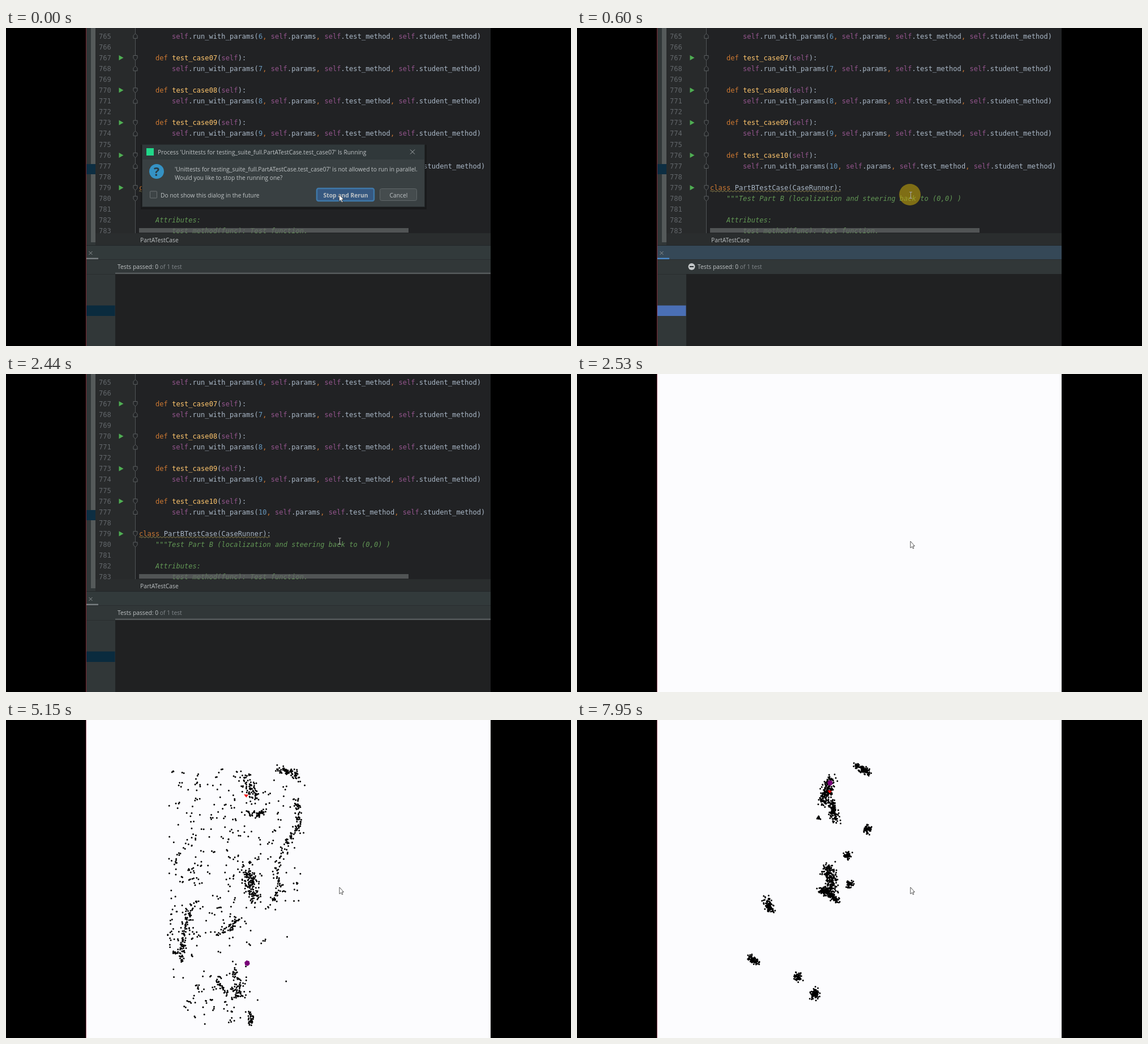
Write an HTML page with a canvas that moves like this. It is 998 by 561 pixels and loops after 8 s.

```html
<!DOCTYPE html>
<html lang="en">
<head>
<meta charset="utf-8">
<title>Particle filter test run</title>
<style>
  html, body { margin: 0; width: 100%; height: 100%; overflow: hidden; background: #000; }
  svg, canvas { position: absolute; left: 0; top: 0; width: 998px; height: 561px; }
  text { white-space: pre; }
  .code { font: 12.1px "DejaVu Sans Mono", monospace; fill: #a9b7c6; }
  .ui { font: 10.3px "Open Sans", sans-serif; fill: #bfc3c5; }
  .num { fill: #62666a; }
  .doc { fill: #629755; font-style: italic; }
  .fold { fill: #222426; stroke: #5c6062; }
</style>
</head>
<body>
<svg viewBox="0 0 998 561">
  <rect x="141" width="715" height="561" fill="#313738"/>
  <rect x="158" width="698" height="362" fill="#212224"/>
  <rect x="158" width="70" height="362" fill="#282a2b"/>
  <rect x="150" width="8" height="378" fill="#555a5a"/>
  <rect x="141" y="240" width="17" height="18" fill="#0d2e42"/>
  <path d="M228.5 0V362" stroke="#505456"/>
  <g id="editor"></g>
  <path id="wave" fill="none" stroke="#96894f"/>
  <rect x="235" y="353" width="476" height="8" fill="#626466" opacity=".75"/>
  <rect x="158" y="362" width="698" height="21" fill="#2a2d2e"/>
  <text class="ui" x="237" y="377.5">PartATestCase</text>
  <rect x="141" y="383" width="715" height="1" fill="#222628"/>

  <rect id="tabs" x="141" y="384" width="715" height="24"/>
  <path d="M146.5 394l6 6m0-6l-6 6" stroke="#8a9092"/>
  <rect id="tabLine" x="142" y="405.5" width="21" height="3"/>
  <path d="M141 408.5H856M141 434.5H193" stroke="#292d2f"/>
  <rect x="193" y="434" width="663" height="127" fill="#202122"/>
  <rect id="bar" x="193" y="431.5" width="663" height="2.5" fill="#565b5c"/>
  <rect id="pick" x="141" width="51.5" height="18.5"/>
  <g id="stopIcon">
    <circle cx="202.5" cy="421" r="6" fill="#c4c8c9"/>
    <path d="M199 421h7" stroke="#2c3234" stroke-width="2"/>
  </g>
  <text id="passed" class="ui" y="425">Tests passed: 0 <tspan fill="#80868a">of 1 test</tspan></text>
  <g id="console" class="code">
    <text x="205" y="448">C:\Users\oak_m\miniconda3\python.exe "C:\Program Files\JetBrains\PyCharm 2020.3.2\plugins\</text>
    <text x="205" y="467">Testing started at 10:17 PM ...</text>
  </g>

  <circle id="halo" cx="588" cy="294" r="19" fill="#c3a50c" opacity=".58"/>
  <path id="beam" d="M587 289.5h5M589.5 290v10M587 300.5h5" stroke="#a5a5a5"/>

  <g id="dialog">
    <rect x="238" y="206" width="505" height="114" opacity=".25"/>
    <rect x="240.5" y="205.5" width="499" height="110" fill="#394042" stroke="#25292b"/>
    <rect x="241" y="206" width="498" height="26" fill="#30383a"/>
    <rect x="248" y="212" width="13" height="13" fill="#21d789"/>
    <text class="ui" x="268" y="223">Process 'Unittests for testing_suite_full.PartATestCase.test_case07' Is Running</text>
    <path d="M714 214.5l8 8m0-8l-8 8" stroke="#a6acae"/>
    <circle cx="266" cy="253" r="13" fill="#3592c4"/>
    <text x="266" y="260.5" text-anchor="middle" fill="#2a3a43" style="font:bold 21px 'Open Sans',sans-serif">?</text>
    <text class="ui" x="298" y="252.5">'Unittests for testing_suite_full.PartATestCase.test_case07' is not allowed to run in parallel.</text>
    <text class="ui" x="298" y="267.5">Would you like to stop the running one?</text>
    <rect x="254.5" y="288" width="12" height="12" rx="1" fill="#3d4446" stroke="#6a7072"/>
    <text class="ui" x="273" y="298.5">Do not show this dialog in the future</text>
    <rect x="549" y="283" width="101" height="22" rx="3" fill="#365880" stroke="#3f78a8" stroke-width="2.5"/>
    <text class="ui" x="600" y="298.5" text-anchor="middle" style="font-weight:bold">Stop and Rerun</text>
    <rect x="660.5" y="283.5" width="65" height="21" rx="3" fill="#454c4e" stroke="#5f6668"/>
    <text class="ui" x="693.5" y="298.5" text-anchor="middle">Cancel</text>
    <path d="M588.5 294v12l2.7-2.5 2 4.3 1.9-.8-2-4.2h3.7z" fill="#fff" stroke="#222" stroke-width=".8"/>
  </g>
  <path d="M141.5 0V561" stroke="#7c2630"/>
  <rect x="856" width="142" height="561"/>
</svg>
<canvas id="field" width="998" height="561"></canvas>

<script>
const LOOP = 8000, WINDOW_OPEN = 2530;
const $ = id => document.getElementById(id);
const show = (id, on) => { $(id).style.display = on ? '' : 'none'; };

// ---- Editor ----
const COLORS = { self: '#94558d', def: '#cc7832', class: '#cc7832', ',': '#cc7832' };
const colorOf = s => COLORS[s] || (/^test_case/.test(s) ? '#ffc66d' : /^\d+$/.test(s) ? '#6897bb' : '#a9b7c6');
const highlight = s => s.split(/(\bself\b|\bdef\b|\bclass\b|test_case\d+|\b\d+\b|,)/)
  .map(part => `<tspan fill="${colorOf(part)}">${part}</tspan>`).join('');
const rowY = row => 14.3 + 19.1 * row;
const line = (row, x, body, cls = '') =>
  `<text class="code ${cls}" x="${x}" y="${rowY(row) + 4.2}">${body}</text>`;
const fold = (row, dir) =>
  `<path class="fold" transform="translate(228.5 ${rowY(row)}) scale(1 ${dir})" d="M-3.5-4h7v5l-3.5 3.5-3.5-3.5z"/>`;
const play = row => `<path d="M199.5 ${rowY(row) - 4.5}l8 4.5-8 4.5z" fill="#4fae53"/>`;

function buildEditor() {
  let out = '';
  for (let row = 0; row < 19; row++) out += line(row, 164, 765 + row, 'num');
  for (let n = 6; n <= 10; n++) {
    const row = (n - 6) * 3;
    if (n > 6) {
      const name = 'test_case' + String(n).padStart(2, '0');
      out += line(row - 1, 264, highlight(`def ${name}(self):`)) + play(row - 1) + fold(row - 1, 1);
    }
    out += line(row, 293, highlight(`self.run_with_params(${n}, self.params, self.test_method, self.student_method)`));
    out += fold(row, -1);
  }
  out += line(14, 235, highlight('class PartBTestCase(CaseRunner):')) + play(14) + fold(14, 1) + fold(15, 1);
  out += line(15, 264, '"""Test Part B (localization and steering back to (0,0) )', 'doc');
  out += line(17, 264, 'Attributes:', 'doc') + line(18, 293, 'test_method(func): Test function.', 'doc');
  $('editor').innerHTML = out;
  $('wave').setAttribute('d', 'M235 288q1.5-2 3 0' + 't3 0'.repeat(76));
}

function drawEditor(t) {
  const active = t >= 550 && t < 870;
  const cleared = t >= 870 && t < 1660;
  show('dialog', t < 500);
  show('beam', t >= 500);
  show('halo', t >= 400 && t < 740);
  show('bar', !active);
  show('stopIcon', active);
  show('passed', !cleared);
  show('console', t >= 1150 && t < 1660);
  $('passed').setAttribute('x', active ? 213 : 197);
  $('pick').setAttribute('y', cleared ? 434.5 : 489.5);
  $('pick').setAttribute('fill', active ? '#4a6fb5' : '#0a2b3e');
  $('tabs').setAttribute('fill', active ? '#354857' : '#323a3b');
  $('tabLine').setAttribute('fill', active ? '#4a88c7' : '#777d80');
}

// ---- Particles ----
const COUNT = 1250, STEP = 136, FIRST = 4140;
const MIDDLE = FIRST + 14 * STEP, LAST = FIRST + 28 * STEP;

let seed = 11;
const rnd = () => {
  seed = (seed * 1664525 + 1013904223) >>> 0;
  return seed / 4294967296;
};
const gauss = () => (rnd() + rnd() + rnd() + rnd() - 2) * 1.73;

// Chance of a particle at a place: full on the left, thinning out to the right.
function density(x, y) {
  if (y > 455 && x < 305) return 0.08;
  const edge = y < 335 ? 500 : 420;
  const thin = y > 395 && y < 450 && x > 330 ? 0.5 : 1;
  return thin * Math.min(1, Math.exp((edge - x) / 30));
}

function scatter() {
  const points = [];
  while (points.length < COUNT) {
    const x = 281 + rnd() * 400, y = 88 + rnd() * 448;
    if (rnd() > density(x, y)) continue;
    for (let k = Math.floor(rnd() * 4); k >= 0; k--)
      points.push([Math.max(281, x + gauss() * 2.5), y + gauss() * 2]);
  }
  return points;
}

// Particles strewn along strokes; each is a spread and the points it runs through.
function strew(strokes) {
  const runs = strokes.map(([spread, ...path]) => {
    const segments = path.slice(1).map((b, i) => [path[i], b, Math.hypot(b[0] - path[i][0], b[1] - path[i][1])]);
    const length = segments.reduce((sum, s) => sum + s[2], 0);
    return { spread, path, segments, length, weight: spread * (length + 20) };
  });
  const total = runs.reduce((sum, r) => sum + r.weight, 0);
  const along = (run, d) => {
    for (const [a, b, len] of run.segments) {
      if (d <= len) return a.map((v, i) => v + (b[i] - v) * d / len);
      d -= len;
    }
    return run.path[run.path.length - 1];
  };
  return Array.from({ length: COUNT }, () => {
    let pick = rnd() * total;
    const run = runs.find(r => (pick -= r.weight) <= 0) || runs[0];
    const [x, y] = along(run, rnd() * run.length);
    return [x + gauss() * run.spread, y + gauss() * run.spread];
  });
}

const POSES = [
  { at: FIRST, points: scatter() },
  { at: MIDDLE, points: strew([
    [4.5, [422, 102], [437, 116], [447, 130], [440, 143]],
    [3, [427, 158], [443, 169], [462, 158]],
    [4.2, [483, 88], [512, 91], [518, 100]],
    [3, [518, 138], [522, 187], [501, 210], [480, 272], [489, 291], [473, 323]],
    [6.5, [429, 267], [440, 292], [442, 322]],
    [2.5, [413, 348], [402, 367], [378, 377]],
    [3.5, [332, 325], [321, 372], [313, 424]],
    [2.5, [298, 411], [310, 408]],
    [3.5, [406, 440], [419, 464], [409, 485], [427, 483]],
    [2, [378, 460], [394, 480]],
    [2.8, [436, 514], [437, 538]]
  ]) },
  { at: LAST, points: strew([
    [3, [492, 79], [516, 94]],
    [4.5, [448, 106], [434, 147]],
    [3.8, [450, 145], [457, 177]],
    [1.5, [427, 172]],
    [4, [512, 194]],
    [3, [478, 239]],
    [5.5, [441, 260], [450, 285], [447, 307]],
    [3, [429, 298], [462, 319]],
    [3.2, [482, 289]],
    [3.5, [334, 318], [345, 338]],
    [3, [306, 419], [319, 429]],
    [3.5, [390, 453]],
    [3.8, [420, 478], [420, 488]]
  ]) }
];

// Each particle is resampled once per leg; those far out to the right go early.
const swaps = POSES[0].points.map(([x]) => [rnd() * (x > 525 ? 0.3 : 1), rnd()]);
const ctx = $('field').getContext('2d');

function polygon(points, fill, stroke) {
  ctx.beginPath();
  points.forEach(([x, y]) => ctx.lineTo(x, y));
  ctx.closePath();
  ctx.fillStyle = fill;
  ctx.fill();
  if (stroke) { ctx.strokeStyle = stroke; ctx.stroke(); }
}

function drawDots(t) {
  const leg = t < MIDDLE ? 0 : 1;
  const from = POSES[leg], to = POSES[leg + 1];
  const u = Math.pow((t - from.at) / (to.at - from.at), leg ? 1 : 0.7);
  ctx.fillStyle = '#000';
  ctx.beginPath();
  for (let i = 0; i < COUNT; i++) {
    const pose = u > swaps[i][leg] ? to : from;
    const age = (t - pose.at) / 1000;
    const x = pose.points[i][0] + 5 * age, y = pose.points[i][1] - age;
    ctx.moveTo(x + 1.5, y);
    ctx.arc(x, y, 1.5, 0, 7);
  }
  ctx.fill();
}

function drawMarkers(t) {
  const [gx, gy] = t < 5800 ? [426, 429] : t < 6700 ? [478, 84] : [447, 111];
  const corner = k => [gx + 5 * Math.cos(k * Math.PI / 3 + 0.3), gy + 5 * Math.sin(k * Math.PI / 3 + 0.3)];
  polygon([0, 1, 2, 3, 4, 5].map(corner), '#780078');

  const moved = (t - FIRST) / (LAST - FIRST);
  const x = 416.8 + 29.5 * moved, y = 136 - 9.5 * moved;
  polygon([[x - 4, y - 2.3], [x + 3.8, y - 1.8], [x + 0.3, y + 3.2]], '#f00000');
}

function drawField(t) {
  ctx.fillStyle = '#fcfcfe';
  ctx.fillRect(141, 0, 715, 561);
  ctx.fillStyle = '#a05c6a';
  ctx.fillRect(141, 0, 1, 561);
  if (t >= FIRST) {
    drawDots(t);
    drawMarkers(t);
  }
  polygon([[589, 295], [589, 307], [591.5, 304.5], [593.5, 308], [595, 307.3], [593.3, 303.5], [596.5, 303.5]],
    '#fff', '#555');
}

// ---- Playback ----
buildEditor();
const start = performance.now();
let drawn = -1;

function frame() {
  const t = (performance.now() - start) % LOOP;
  show('field', t >= WINDOW_OPEN);
  if (t < WINDOW_OPEN) {
    drawEditor(t);
  } else {
    const step = t < FIRST ? WINDOW_OPEN : t - (t - FIRST) % STEP;
    const tick = Math.round(step);
    if (tick !== drawn) drawField(tick);
    drawn = tick;
  }
  requestAnimationFrame(frame);
}
frame();
</script>
</body>
</html>
```
